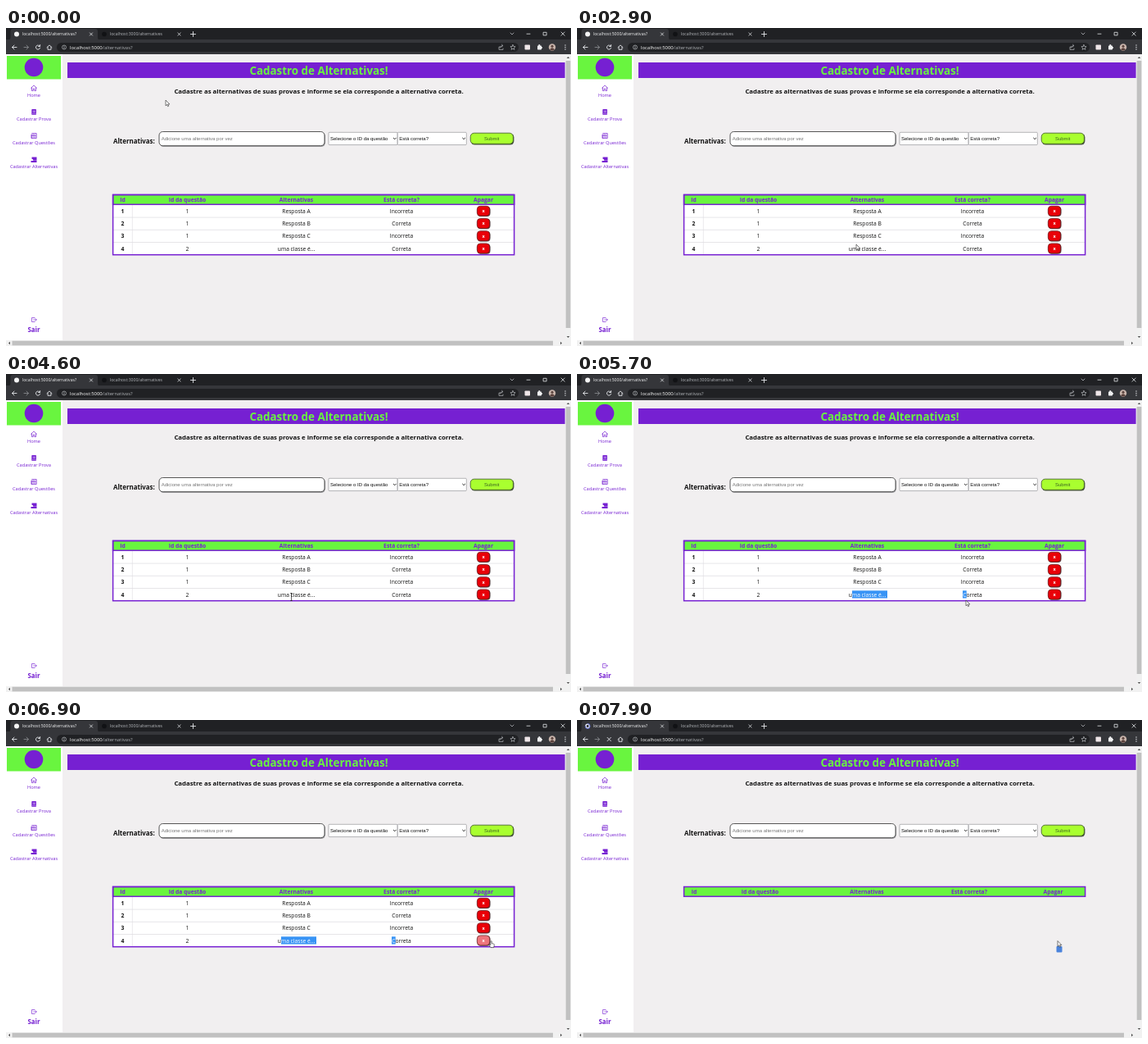
Animation, 690 px wide and 388 px high, one loop 8 s. Source, as an HTML page:

```html
<!DOCTYPE html>
<html lang="pt">
<head>
<meta charset="utf-8">
<title>Cadastro de Alternativas</title>
<style>
  html, body { margin: 0; width: 100%; height: 100%; overflow: hidden; background: #f1eff0; }
  svg { display: block; width: 690px; height: 388px; font-family: "Open Sans", "Noto Sans", sans-serif; cursor: default; }
  .form { font-family: "Liberation Sans", Arial, sans-serif; font-size: 6px; }
  .bold { font-weight: 700; }
  .mid { text-anchor: middle; }
  .line { fill: none; stroke-linecap: round; stroke-linejoin: round; }
</style>
</head>
<body>
<svg viewBox="0 0 690 388">
  <g id="page"></g>
  <g id="chrome"></g>
  <g id="popup"><rect width="7" height="7.5" rx="1" fill="#4a83dc"/></g>
  <g id="cursor"></g>
</svg>
<script>
const LOOP = 8000, STEP = 100;
const PURPLE = '#7620d2', GREEN = '#69f53f', INK = '#111', PAPER = '#f1eff0';
const WIDE = 690 / 683;

const $ = id => document.getElementById(id);
const rect = (x, y, w, h, fill, more = '') =>
  `<rect x="${x}" y="${y}" width="${w}" height="${h}" fill="${fill}" ${more}/>`;
const text = (s, x, y, size, fill, cls = '') =>
  `<text x="${x}" y="${y}" font-size="${size}" fill="${fill}" class="${cls}">${s}</text>`;
const line = (d, stroke, width = 1) =>
  `<path class="line" d="${d}" stroke="${stroke}" stroke-width="${width}"/>`;
const shape = (d, fill) => `<path d="${d}" fill="${fill}"/>`;
const circle = (x, y, r, fill) => `<circle cx="${x}" cy="${y}" r="${r}" fill="${fill}"/>`;

// Browser frame

function drawChrome(loading) {
  const pale = '#e4e6e9', soft = '#b9bcc0';
  let s = rect(0, 0, 690, 15, '#202124') + rect(0, 14, 690, 18, '#35363a');
  s += shape('M2 15Q5.5 15 5.5 11V4Q5.5 1 8.500 1H109Q112 1 112 4V11Q112 15 115 15Z', '#35363a');
  s += loading
    ? circle(13, 7.5, 3, '#e8eaf4') + line('M13 4.500A3 3 0 1 1 10 7.500', '#5a68c8', 1) + circle(13, 7.5, 1.4, '#25262c')
    : circle(13, 7.5, 3, '#f4f4f4');
  s += text('localhost:5000/alternativas?', 20, 9.4, 5.1, '#f4f5f6');
  s += circle(120, 7.5, 2.8, '#111215');
  s += text('localhost:3000/alternatives', 127, 9.4, 5.1, '#b4b7bb');
  for (const x of [104, 211.5]) s += line(`M${x - 1.6} 5.900l3.200 3.200m0 -3.200l-3.200 3.200`, pale, .8);
  s += line('M225.500 7.500h6m-3 -3v6', pale, .9);
  s += line('M616 6l2 2 2 -2', soft, .8) + line('M636 7.200h4', pale, .8);
  s += line('M656.500 5.300h3.600v3.600h-3.600z', pale, .8) + line('M678 5l4.200 4.200m0 -4.200l-4.200 4.200', pale, .8);

  s += line('M13 23.500H7.500m2.500 -2.500l-2.500 2.500 2.500 2.500', pale, .9);
  s += line('M22 23.500h5.500m-2.500 -2.500l2.500 2.500 -2.500 2.500', '#85878b', .9);
  s += loading
    ? line('M37 21.300l4.400 4.400m0 -4.400l-4.400 4.400', pale, .9)
    : line('M41.300 22.200A2.600 2.600 0 1 0 41.600 24.300M41.600 20.500v2h-2', pale, .9);
  s += line('M50 23.700l3 -2.800 3 2.800M51 23.200v3.100h4v-3.100', pale, .9);
  s += rect(62, 18, 564, 11, '#202124', 'rx="5.500"');
  s += `<circle cx="71" cy="23.500" r="2.500" fill="none" stroke="${soft}" stroke-width=".7"/>` + line('M71 23.300v1.300M71 22.200v.1', soft, .7);
  s += `<text x="78" y="25.600" font-size="5.9" fill="#fff">localhost:5000<tspan fill="#b0b3b7">/alternativas?</tspan></text>`;
  s += line('M604 23h-2v3.400h5v-1.400M603.500 24q.5 -2.500 3 -2.500m-1 -1.300l1.400 1.300 -1.400 1.300', soft, .7);
  s += line('M619 20.500l.9 2 2.200.2 -1.700 1.500.5 2.200 -1.900 -1.200 -1.900 1.200.5 -2.200 -1.700 -1.500 2.200 -.2z', soft, .7);
  s += rect(633.5, 20.5, 6.5, 6, '#efe6e8', 'rx=".8"');
  s += rect(649, 21.5, 5, 5, '#f1f2f3', 'rx=".7"') + circle(651.3, 21.2, 1.1, '#f1f2f3') + circle(654, 24, 1.1, '#f1f2f3');
  s += circle(667, 23.5, 4.2, '#c9b5ac') + circle(667, 22.3, 1.5, '#59413c') + shape('M664 26.500q3 -4.500 6 0q-3 2.200 -6 0z', '#59413c');
  for (const y of [21, 23.5, 26]) s += circle(683, y, .7, pale);
  $('chrome').innerHTML = s;
}

// Page

function sidebar(k) {
  const c = 34 * k;
  let s = rect(0, 32, 69 * k, 349, '#fff') + rect(1, 34, 66 * k, 28.5, GREEN);
  s += circle(c, 48, 11.3, PURPLE);
  const labels = [['Home', 83.7], ['Cadastrar Prova', 113.1], ['Cadastrar Questões', 142], ['Cadastrar Alternativas', 171.2]];
  for (const [name, y] of labels) s += text(name, c, y, 5.65, PURPLE, 'mid');
  s += text('Sair', c, 370.9, 7.9, PURPLE, 'mid bold');
  s += `<g transform="translate(${c} 0)">`;
  s += line('M-3.500 73.200L0 70l3.500 3.200M-2.500 72.600v4h1.700v-2.500h1.600v2.500h1.700v-4', PURPLE, .7);
  s += rect(-2.7, 99, 5.6, 7, PURPLE, 'rx=".8"') + line('M-.9 101h2.400M-.9 102.500h2.400M-1.600 104.800h3.900', '#fff', .5);
  s += line('M-2.300 128.500h5.500v6h-6.300v-4.500h.8v4M-.9 130.100h1.300v1.300h-1.300zM1.500 130.300h.6M1.500 131.500h.6M-.9 133h3', PURPLE, .7);
  s += shape('M-2.500 157.500h6v4.200h-4.200q0 -2 -1.800 -2zM-3.500 161.900h7v2.200h-7z', PURPLE);
  s += line('M1 353.500h-3.500v5h3.500M-.3 356h3.500m-1.300 -1.400l1.400 1.400 -1.400 1.400', PURPLE, .65);
  return s + '</g>';
}

function form(k) {
  const box = (x, y, w, h, fill, stroke, r, sw) =>
    rect(x * k, y, w * k, h, fill, `rx="${r}" stroke="${stroke}" stroke-width="${sw}"`);
  let s = text('Alternativas:', 131 * k, 140.9, 7.9, INK, 'bold') + '<g class="form">';
  s += rect(187.6 * k, 127.5, 202.2 * k, 17.2, '#8b8b8e', 'rx="4.500"');
  s += box(187, 126.5, 202, 17.2, '#fff', '#444', 4.5, .9);
  s += text('Adicione uma alternativa por vez', 189.7 * k, 137.1, 6, '#757575');
  [[394, 'Selecione o ID da questão'], [478.3, 'Está correta?']].forEach(([x, label]) => {
    s += box(x, 127.3, 84, 15.3, '#fff', '#85858a', 1, .6) + text(label, (x + 2) * k, 137.1, 6, INK);
    s += line(`M${(x + 79.3) * k} 134.200l1.500 1.500 1.500 -1.500`, INK, .9);
  });
  s += rect(567.8 * k, 129, 52.6 * k, 13.6, '#4b5540', 'rx="4.500"');
  s += box(567.2, 128.2, 52.2, 13.2, '#a9ff2f', '#3c5426', 4.5, .8);
  return s + text('Submit', 593.2 * k, 137.1, 5.9, '#3d6122', 'mid') + '</g>';
}

const ROWS = [
  ['1', '1', 'Resposta A', 'Incorreta'],
  ['2', '1', 'Resposta B', 'Correta'],
  ['3', '1', 'Resposta C', 'Incorreta'],
  ['4', '2', 'uma classe é...', 'Correta'],
];
const HEADS = ['Id', 'Id da questão', 'Alternativas', 'Está correta?', 'Apagar'];
const FULL = [142.5, 221.5, 354.5, 483, 583];
const BARE = [143, 223.5, 354, 479, 581.5];

function selected(label, x, y, left, right, id) {
  if (right <= left) return '';
  return rect(left, 264.3, right - left, 9.2, '#3793f5') +
    `<clipPath id="${id}">${rect(left, 264, right - left, 10, '#000')}</clipPath>` +
    `<g clip-path="url(#${id})">${text(label, x, y, 6.7, '#fff', 'mid')}</g>`;
}

function table(k, st) {
  const cols = (st.empty ? BARE : FULL).map(x => x * k);
  const x0 = 130.6 * k, w = 490 * k, border = `stroke="${PURPLE}" stroke-width="1.500"`;
  let s = '';
  if (!st.empty) {
    s += rect(x0, 203.5, w, 73.2, '#fff');
    for (const y of [231.1, 246.3, 261.5]) s += line(`M${x0} ${y}h${w}`, '#d5d3d8', .6);
    s += line(`M${154.3 * k} 216v60`, '#dddbe0', .6);
    ROWS.forEach((row, i) => {
      const mid = 223.5 + i * 15.2, y = mid + 2.4;
      row.forEach((v, c) => s += text(v, cols[c], y, 6.7, INK, c ? 'mid' : 'mid bold'));
      const x = cols[4] - 8;
      s += rect(x + .7, mid - 5.6, 15.8, 12.2, '#5a4a4c', 'rx="4"');
      s += rect(x + .3, mid - 6.2, 15.4, 12, st.pressed && i === 3 ? '#ee757c' : '#e90008', 'rx="4" stroke="#5c1a1e" stroke-width=".7"');
      s += text('x', cols[4], mid + 1.6, 5.6, '#fff', 'mid bold');
    });
    const [, , a, b] = cols;
    s += selected(ROWS[3][2], a, 271.5, a - 18.5, Math.min(a + 24.5, a - 18.5 + st.sel), 'selA');
    s += selected(ROWS[3][3], b, 271.5, b - 12, Math.min(b - 7.3, a - 18.5 + st.sel), 'selB');
  }
  s += rect(x0, 203.5, w, 11.8, GREEN, border);
  HEADS.forEach((h, i) => s += text(h, cols[i], 212, 6.75, PURPLE, 'mid bold'));
  if (!st.empty) s += rect(x0, 203.5, w, 73.2, 'none', border);
  return s;
}

function scrollbars(wide) {
  const end = wide ? 690 : 683, grey = '#505050';
  let s = rect(0, 381, 690, 7, '#f1f1f1') + rect(7.5, 381.7, end - 22.5, 5.6, '#c1c1c1');
  s += shape('M5 382.700v3.600l-2 -1.800z', grey) + shape(`M${end - 6} 382.700v3.600l2 -1.800z`, grey);
  if (!wide) {
    s += rect(683, 32, 7, 349, '#f1f1f1') + rect(683.7, 40, 5.6, 326, '#c1c1c1');
    s += shape('M684.700 37h3.600l-1.800 -2z', grey) + shape('M684.700 376h3.600l-1.800 2z', grey);
  }
  return s;
}

function drawPage(st) {
  const k = st.wide ? WIDE : 1;
  $('page').innerHTML = rect(0, 32, 690, 356, PAPER) + sidebar(k) +
    rect(75 * k, 42, 607.6 * k, 19, PURPLE) +
    text('Cadastro de Alternativas!', 382 * k, 57.3, 13.4, GREEN, 'mid bold') +
    text('Cadastre as alternativas de suas provas e informe se ela corresponde a alternativa correta.', 382 * k, 79.6, 7.8, INK, 'mid bold') +
    form(k) + table(k, st) + scrollbars(st.wide);
}

// Pointer

const POINTERS = {
  arrow: '<path d="M0 0V6.800L1.600 5.400 2.600 7.700 3.700 7.200 2.700 5H4.800Z" fill="#fff" stroke="#222" stroke-width=".6"/>',
  beam: line('M-1 -4.500h2M-1 4.500h2M0 -4.500v9', '#222', .7),
  hand: '<path d="M-.7 .4Q0 -.5 .7 .4V3l2.600.6Q4 4 3.800 5L3.200 8H-.5L-2.500 5.200Q-2.400 4.200 -1.400 4.600L-.7 5.200Z" fill="#fff" stroke="#222" stroke-width=".6"/>',
};

// time, x, y
const PATH = [
  [1100, 195, 88], [1300, 270, 72], [1450, 430, 62], [1600, 565, 90], [1700, 620, 130],
  [1800, 590, 165], [1900, 530, 190], [2000, 474, 200],
  [2200, 430, 216], [2400, 355, 238], [2600, 313, 260], [2900, 341, 264],
  [3100, 290, 240], [3250, 244, 200], [3400, 290, 152], [3550, 420, 145], [3700, 484, 200], [3800, 430, 266],
  [3900, 300, 262], [4000, 231, 195], [4100, 562, 150], [4200, 402, 262], [4300, 402, 262],
  [4600, 348.5, 272], [5000, 337, 270], [5200, 336, 270],
  [5700, 475, 276], [5900, 475, 276], [6400, 597, 266.8], [6900, 592.5, 269.6], [7400, 592, 269.6], [7800, 587, 269.5],
];

function pointAt(t) {
  const i = PATH.findIndex(p => p[0] > t);
  if (i === 0) return PATH[0].slice(1);
  if (i < 0) return PATH[PATH.length - 1].slice(1);
  const [t0, x0, y0] = PATH[i - 1], [t1, x1, y1] = PATH[i];
  const u = (t - t0) / (t1 - t0);
  return [x0 + (x1 - x0) * u, y0 + (y1 - y0) * u];
}

const within = (t, a, b) => t >= a && t < b;

function stateAt(t) {
  const [x, y] = pointAt(t);
  return {
    x, y,
    pointer: within(t, 4400, 5600) ? 'beam' : within(t, 6300, 7500) ? 'hand' : 'arrow',
    popup: within(t, 5900, 6800) ? 472.5 : t >= 7100 ? 585.5 : null,
    loading: t >= 7500,
    page: {
      wide: within(t, 5900, 6800) || within(t, 7100, 7500),
      pressed: within(t, 6800, 7100),
      empty: t >= 7500,
      sel: t < 5300 || t >= 7500 ? 0 : t < 5700 ? Math.round(x - 336) : 200,
    },
  };
}

const last = {};
function changed(name, value) {
  const key = JSON.stringify(value);
  if (last[name] === key) return false;
  last[name] = key;
  return true;
}

function frame(now) {
  const st = stateAt(Math.floor(now % LOOP / STEP) * STEP);
  if (changed('page', st.page)) drawPage(st.page);
  if (changed('chrome', st.loading)) drawChrome(st.loading);
  if (changed('pointer', st.pointer)) $('cursor').innerHTML = POINTERS[st.pointer];
  $('cursor').setAttribute('transform', `translate(${st.x} ${st.y})`);
  $('popup').setAttribute('visibility', st.popup === null ? 'hidden' : 'visible');
  $('popup').setAttribute('transform', `translate(${st.popup || 0} 276)`);
  requestAnimationFrame(frame);
}
frame(performance.now());
</script>
</body>
</html>
```
